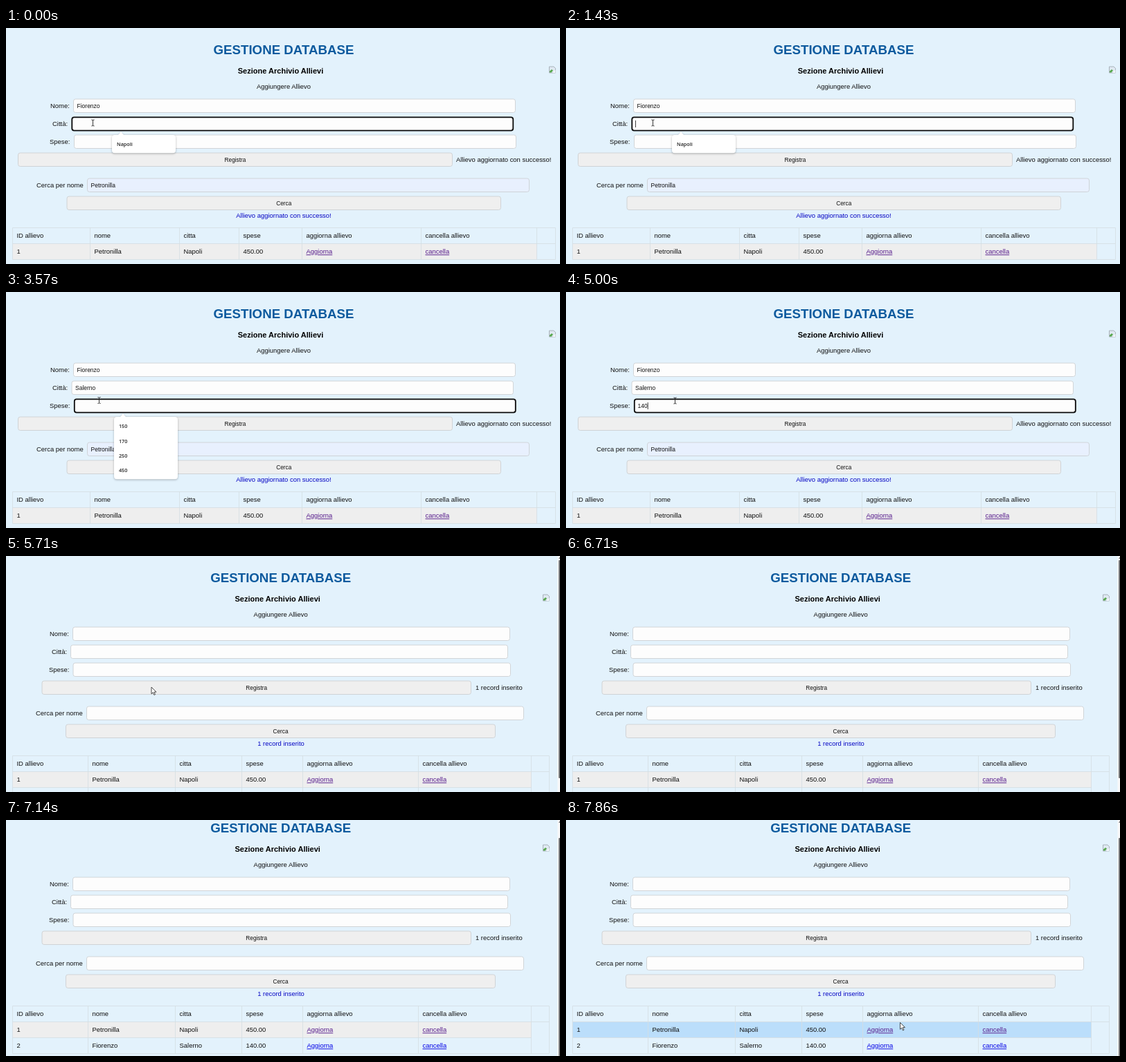
Animation of 800 by 342 pixels, one loop 8 s. Source, as an HTML page:

```html
<!DOCTYPE html>
<html lang="it">
<head>
<meta charset="utf-8">
<title>Gestione database</title>
<style>
html, body { margin: 0; width: 100%; height: 100%; overflow: hidden; background: #e3f2fc; }
svg { display: block; width: 100vw; height: 100vh; }
text { font: 9.45px "Liberation Sans", Arial, sans-serif; fill: #111; white-space: pre; }
text.h1 { font-size: 18.72px; font-weight: 700; fill: #0d5a9e; }
text.h3 { font-size: 11.03px; font-weight: 700; fill: #000; }
text.mid { text-anchor: middle; }
text.val { font-size: 8.5px; }
text.btn { font-size: 8.3px; }
text.msg { fill: #0505c4; }
text.link { fill: #0000e6; text-decoration: underline; }
text.seen { fill: #551a8b; }
text.opt { font: 600 7.2px "Open Sans", "Noto Sans", sans-serif; fill: #222; }
.box { fill: #fdfdfd; stroke: #c9cccf; stroke-width: .8; }
.auto { fill: #e8f0fe; }
.push { fill: #efefef; }
.ring { fill: none; stroke: #0b0b0b; stroke-width: 1.8; }
.grid { fill: none; stroke: #d5dde3; stroke-width: .8; }
.odd { fill: #eee; }
.hover { fill: #bbdefb; }
.pop { fill: #fff; filter: drop-shadow(0 1px 1.5px rgba(0, 0, 0, .28)); }
.caret { stroke: #111; stroke-width: .8; }
</style>
</head>
<body>
<svg viewBox="0 0 800 342" id="stage"></svg>
<script>
const LOOP = 8000;
const OFF = [-50, -50];
const PERSON_A = 'Petronilla', PERSON_B = 'Fiorenzo';

const text = (x, y, s, cls = '', id = '') =>
  `<text x="${x}" y="${y}" class="${cls}" id="${id}">${s}</text>`;
const rect = (x, y, w, h, cls, r = 0, id = '') =>
  `<rect x="${x}" y="${y}" width="${w}" height="${h}" rx="${r}" class="${cls}" id="${id}"/>`;
const box = (x0, x1, y, cls = '') =>
  rect(x0 + .5, y + .5, x1 - x0 - 1, 19.5, 'box ' + cls, 3);

const field = (label, labelX, x0, x1, y, cls) =>
  text(labelX, y + 13.3, label) + box(x0, x1, y, cls);

const button = (label, x0, x1, y) =>
  box(x0, x1, y, 'push') + text((x0 + x1) / 2, y + 13.1, label, 'btn mid');

const brokenImage = x => `<g transform="translate(${x} 55.5)">
  <path d="M.5 .5H7L9.5 3V9.5H.5Z" fill="#dfe9f2" stroke="#9aa3aa" stroke-width=".8"/>
  <path d="M1 9V7L4 4.5 6 6 3.5 9Z" fill="#58a84f"/>
  <path d="M5 9.5 9.5 5V9.5Z" fill="#f4f8fb"/></g>`;

// One row per student; the heading has one more, empty, column.
function table(cols, rows, prefix) {
  const top = 289.5, rowH = 23, left = cols[0], right = cols[7];
  const bottom = top + rowH * (rows.length + 1);
  const heads = ['ID allievo', 'nome', 'citta', 'spese', 'aggiorna allievo', 'cancella allievo'];
  let out = '', lines = `M${left} ${top}H${right}V${bottom}H${left}Z`;
  heads.forEach((h, i) => out += text(cols[i] + 6, top + 14.5, h));
  rows.forEach((row, r) => {
    const y = top + rowH * (r + 1);
    out += rect(left, y, cols[6] - left, rowH, r % 2 ? '' : 'odd', 0, prefix + r)
      .replace('class=""', 'fill="#e3f2fc"');
    [...row.cells, 'Aggiorna', 'cancella'].forEach((c, i) =>
      out += text(cols[i] + 6, y + 14.8, c, i < 4 ? '' : 'link ' + row.link));
    lines += `M${left} ${y}H${r ? cols[6] : right}`;
  });
  cols.slice(1, 7).forEach(x => lines += `M${x} ${top}V${bottom}`);
  return out + `<path d="${lines}" class="grid"/>`;
}

const first = { cells: [1, PERSON_A, 'Napoli', '450.00'], link: 'seen' };
const second = { cells: [2, PERSON_B, 'Salerno', '140.00'], link: '' };

const titles = (mid, iconX) =>
  text(mid, 38, 'GESTIONE DATABASE', 'h1 mid') +
  text(mid - 4.5, 65.6, 'Sezione Archivio Allievi', 'h3 mid') +
  text(mid, 88.4, 'Aggiungere Allievo', 'mid') + brokenImage(iconX);

const popup = (id, x, y, options) => {
  const h = options.length * 21.3 + 5;
  return `<g id="${id}"><path class="pop" d="M${x + 4} ${y}h5l4 -4.5 4 4.5h71q4 0 4 4v${h - 8}q0 4 -4 4h-84q-4 0 -4 -4v-${h - 8}q0 -4 4 -4z"/>` +
    options.map((o, i) => text(x + 7, y + 16.2 + i * 21.3, o, 'opt')).join('') + '</g>';
};

const formPage = `<g id="form">
  ${titles(401, 784)}
  ${field('Nome:', 64, 97, 736, 102.5)}${text(102.5, 116, PERSON_B, 'val')}
  ${field('Città:', 67, 94.5, 733, 128.5)}${text(100, 142, '', 'val', 'city')}
  ${field('Spese:', 63, 98, 737, 154.5)}${text(103.5, 168, '', 'val', 'cost')}
  ${button('Registra', 17, 645, 180.5)}
  ${text(650, 193.8, 'Allievo aggiornato con successo!')}
  ${field('Cerca per nome', 44, 117, 756, 217.5, 'auto')}${text(122.5, 231, PERSON_A, 'val')}
  ${button('Cerca', 87.5, 715, 243.5)}
  ${text(401, 275.2, 'Allievo aggiornato con successo!', 'msg mid')}
  ${table([9.5, 121.5, 250.5, 336.5, 427.5, 599.5, 766.5, 793.5], [first], 'a')}
  ${rect(95.3, 129.4, 637, 19.2, 'ring', 3, 'cityRing')}
  ${rect(98.8, 155.4, 637, 19.2, 'ring', 3, 'costRing')}
  <line class="caret" id="caret" y1="0" y2="10"/>
  ${popup('cityPop', 153, 155, ['Napoli'])}
  ${popup('costPop', 156, 181, [150, 170, 250, 450])}
  ${popup('costPop2', 156, 181, [150, 170])}
</g>`;

const resultPage = `<g id="result"><g id="scroll">
  ${titles(396.7, 775)}
  ${field('Nome:', 63, 96, 728, 102.5)}
  ${field('Città:', 66, 93, 725, 128.5)}
  ${field('Spese:', 62, 96.5, 729, 154.5)}
  ${button('Registra', 51.5, 672, 180.5)}
  ${text(678, 193.8, '1 record inserito')}
  ${field('Cerca per nome', 43, 116, 748, 217.5)}
  ${button('Cerca', 86, 707, 243.5)}
  ${text(397, 275.2, '1 record inserito', 'msg mid')}
  ${table([9.5, 118.5, 244.5, 340.5, 428.5, 595.5, 758.5, 784.5], [first, second], 'b')}
  </g>
  ${rect(796.5, 0, 3.5, 342, '').replace('class=""', 'fill="#f7f8f9"')}
  <rect id="thumb" x="798" y="6" width="3" height="316" rx="1" fill="#77797b"/>
  <path d="M798 4l2-3v3z" fill="#77797b"/>
</g>`;

const pointers = `
  <path id="beam" d="M-2-4.5Q0-4.5 0-3.5Q0-4.5 2-4.5M0-3.5V3.5M-2 4.5Q0 4.5 0 3.5Q0 4.5 2 4.5" fill="none" stroke="#222" stroke-width=".9"/>
  <path id="arrow" d="M0 0V9.8L2.3 7.7 3.9 11.4 5.5 10.7 3.9 7.1H7Z" fill="#fff" stroke="#222" stroke-width=".8"/>`;

document.getElementById('stage').innerHTML = formPage + resultPage + pointers;

const el = id => document.getElementById(id);
const show = (id, on) => el(id).style.display = on ? '' : 'none';
const move = (id, x, y) => el(id).setAttribute('transform', `translate(${x} ${y})`);
const at = (cues, t) => cues.findLast(c => c[0] <= t)[1];
const within = (t, a, b) => t >= a && t < b;
const typed = (word, times, t) => word.slice(0, times.filter(k => k <= t).length);

const SUBMIT = 5430, RELOAD = 5570, FOCUS_COST = 3140;
const cityKeys = [1570, 1860, 2000, 2140, 2430, 2570, 2710];
const costKeys = [4140, 4570, 5000];
const caretCues = [[0, false], [140, true], [1000, false], [1430, true],
  [3570, false], [4000, true], [SUBMIT, false]];
const beamCues = [[0, [125.5, 137.5]], [2860, [130, 148]], [3000, [134.5, 157]],
  [4000, [157.5, 157.5]], [5140, [172, 168]], [5290, OFF]];
const arrowCues = [[0, OFF], [5290, [196, 187]], [5430, [210, 190]], [6140, [262, 186]],
  [6290, [420, 172]], [6430, [600, 154]], [6570, [752, 138]], [6710, OFF],
  [7570, [690, 318]], [7710, [560, 303]], [7860, [482.5, 293.5]]];
const scrollCues = [[0, 0], [7000, 12], [7140, 20]];
const hoverCues = [[0, -1], [7570, 1], [7710, 0]];

function render(t) {
  show('form', t < RELOAD);
  show('result', t >= RELOAD);

  el('city').textContent = typed('Salerno', cityKeys, t);
  el('cost').textContent = typed('140', costKeys, t);
  const onCost = t >= FOCUS_COST;
  show('cityRing', !onCost);
  show('costRing', onCost && t < SUBMIT);
  show('cityPop', t < cityKeys[0]);
  show('costPop', within(t, FOCUS_COST, costKeys[0]));
  show('costPop2', within(t, costKeys[0], costKeys[1]));

  show('caret', at(caretCues, t));
  if (t < RELOAD) {
    const active = el(onCost ? 'cost' : 'city');
    const width = active.textContent ? active.getComputedTextLength() : 0;
    move('caret', +active.getAttribute('x') + width + .5, onCost ? 160 : 134);
  }

  const y = at(scrollCues, t);
  move('scroll', 0, -y);
  move('thumb', 0, y);
  const hovered = at(hoverCues, t);
  [0, 1].forEach(r => el('b' + r).classList.toggle('hover', r === hovered));
  move('beam', ...at(beamCues, t));
  move('arrow', ...at(arrowCues, t));
}

function tick() {
  render(performance.now() % LOOP);
  requestAnimationFrame(tick);
}
tick();
</script>
</body>
</html>
```
